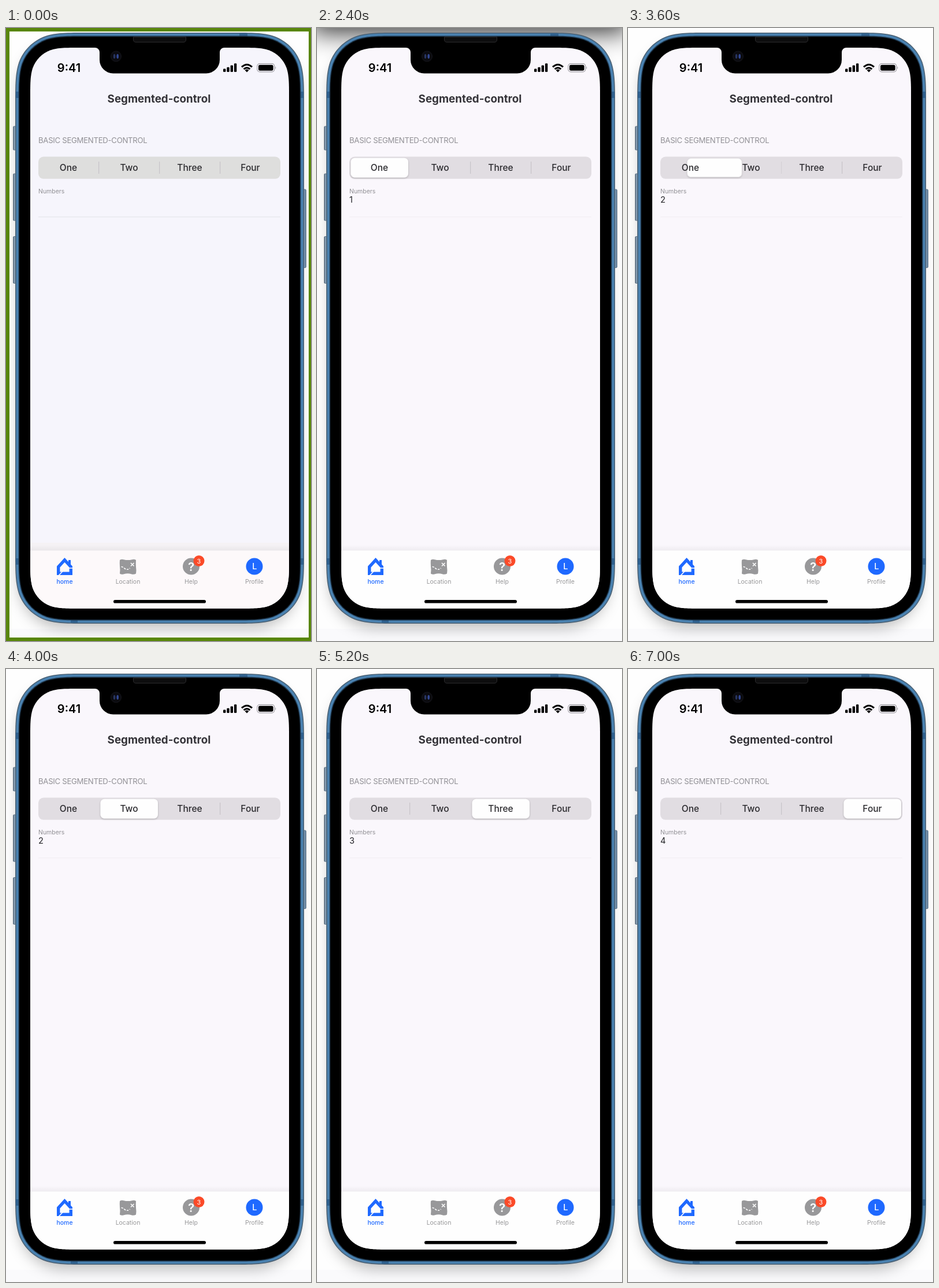
An HTML page for the animation above (8.8 s loop, 528 px wide and 1060 px high).

```html
<!DOCTYPE html>
<html lang="en">
<head>
<meta charset="utf-8">
<title>Segmented control</title>
<style>
  html, body { margin: 0; width: 100%; height: 100%; overflow: hidden; background: #fefefe; }
  svg { display: block; }
  #stage { width: 100vw; height: 100vh; font-family: Inter, Roboto, sans-serif; }
  .mid { text-anchor: middle; }
  .muted { fill: #919095; }
  .title { font-size: 18.8px; font-weight: 700; fill: #343338; }
  .label { font-size: 15.5px; font-weight: 500; fill: #2b2a2e; }
  .tab { font-size: 10.5px; text-anchor: middle; }
  .gray { fill: #98989a; }
  .blue { fill: #1f69ff; }

  /* Every track shares one 8.8 s clock and holds its pose between steps. */
  #stage, .anim { animation: 8.8s step-end infinite; }
  #stage { animation-name: tint; }
  .frame { animation-name: frame; }
  .above { animation-name: above; }
  .thumb { animation-name: slide; transform-box: fill-box; transform-origin: center; }
  .digits { animation-name: count; }
  .sep1 { animation-name: sep1; }
  .sep2 { animation-name: sep2; }
  .sep3 { animation-name: sep3; }

  @keyframes tint {
    0% { --page: #f6f5fc; --seg: #dededd; --rule: #e6e6eb; --bar: #fdf9fa; --band: .9; }
    2.27%, 100% { --page: #faf7fc; --seg: #e1dde2; --rule: #f2eff4; --bar: #fefefe; --band: 0; }
  }
  @keyframes frame { 0% { opacity: 1 } 2.27%, 100% { opacity: 0 } }
  @keyframes above { 0% { opacity: 0 } 2.27% { opacity: 1 } 36.36%, 100% { opacity: 0 } }
  @keyframes slide {
    0% { opacity: 0; transform: none }
    27.27% { opacity: 1; transform: none }
    40.9% { opacity: 1; transform: translateX(41.5px) scale(.95) }
    43.18% { opacity: 1; transform: translateX(105px) scale(.95) }
    45.45% { opacity: 1; transform: translateX(105px) }
    54.54% { opacity: 1; transform: translateX(161.5px) scale(.95) }
    56.81% { opacity: 1; transform: translateX(210px) scale(.95) }
    59.09% { opacity: 1; transform: translateX(210px) }
    74.99% { opacity: 1; transform: translateX(286.5px) scale(.95) }
    77.27% { opacity: 1; transform: translateX(315px) scale(.95) }
    79.54%, 100% { opacity: 1; transform: translateX(315px) }
  }
  @keyframes count {
    0% { transform: translateY(30px) }
    27.27% { transform: none }
    40.9% { transform: translateY(-30px) }
    54.54% { transform: translateY(-60px) }
    74.99%, 100% { transform: translateY(-90px) }
  }
  @keyframes sep1 { 0% { opacity: 1 } 27.27% { opacity: 0 } 56.81%, 100% { opacity: 1 } }
  @keyframes sep2 { 0% { opacity: 1 } 40.9% { opacity: .5 } 43.18% { opacity: 0 } 74.99%, 100% { opacity: 1 } }
  @keyframes sep3 { 0% { opacity: 1 } 54.54% { opacity: .5 } 56.81%, 100% { opacity: 0 } }
</style>
</head>
<body>
<svg id="stage" viewBox="0 0 528 1060" preserveAspectRatio="none">
  <defs>
    <filter id="soft" x="-30%" y="-30%" width="160%" height="160%"><feGaussianBlur stdDeviation="12"/></filter>
    <filter id="wide" x="-30%" y="-60%" width="160%" height="220%"><feGaussianBlur stdDeviation="22"/></filter>
    <filter id="lift" x="-20%" y="-30%" width="140%" height="170%">
      <feDropShadow dx="0" dy="1.2" stdDeviation="1.5" flood-opacity=".24"/>
    </filter>
    <linearGradient id="fade" x2="0" y2="1">
      <stop offset="0" stop-color="#000" stop-opacity="0"/>
      <stop offset="1" stop-color="#000" stop-opacity=".05"/>
    </linearGradient>
    <linearGradient id="key">
      <stop offset="0" stop-color="#4c5c6b"/>
      <stop offset=".35" stop-color="#91a8bd"/>
      <stop offset="1" stop-color="#5b7c9a"/>
    </linearGradient>
    <clipPath id="glass"><path data-box="42 34 448 969.7 56"/></clipPath>
  </defs>

  <!-- Backdrop -->
  <rect width="528" height="1060" fill="#fefefe"/>
  <rect y="1039" width="528" height="21" fill="#fafafc"/>
  <rect class="anim above" x="-10" y="-140" width="548" height="148" filter="url(#wide)" fill-opacity=".8"/>
  <rect x="22" y="28" width="484" height="1010" rx="78" filter="url(#soft)" fill-opacity=".26"/>
  <path class="anim frame" fill="#588609" fill-rule="evenodd" d="M0 0H528V1060H0ZM6 6V1054H524V6Z"/>

  <!-- Phone body -->
  <g fill="url(#key)" stroke="#52687b" stroke-width=".8">
    <rect x="12.4" y="170" width="7" height="41" rx="1.6"/>
    <rect x="12.4" y="252" width="7" height="81" rx="1.6"/>
    <rect x="12.4" y="360.5" width="7" height="81" rx="1.6"/>
    <rect x="512" y="279" width="7.4" height="135.5" rx="1.6"/>
  </g>
  <path data-box="16 8 500 1022 82" fill="#4a6073"/>
  <path data-box="17.6 9.6 496.8 1018.8 80.4" fill="#4a82b1"/>
  <g fill="#2f618f">
    <rect x="404" y="9.6" width="14" height="4.4"/>
    <rect x="112" y="1024" width="12" height="4.4"/>
    <rect x="17" y="110" width="6" height="11"/>
    <rect x="509" y="110" width="6" height="11"/>
    <rect x="17" y="917" width="6" height="11"/>
    <rect x="509" y="917" width="6" height="11"/>
  </g>
  <path data-box="21.6 13.6 488.8 1010.8 76.4" fill="#1c3246"/>
  <path data-box="23.2 15.2 485.6 1007.6 74.800"/>

  <!-- Screen -->
  <g clip-path="url(#glass)">
    <rect x="42" y="34" width="448" height="970" style="fill: var(--page)"/>
    <rect x="42" y="890" width="448" height="14" fill="#f5f2f4" style="opacity: var(--band)"/>
    <rect x="42" y="894" width="448" height="10" fill="url(#fade)"/>
    <rect x="42" y="903.5" width="448" height="101" style="fill: var(--bar)"/>
  </g>

  <!-- Notch, speaker, camera -->
  <path d="M154 33V34A8 8 0 0 1 162 42V55A23.5 23.5 0 0 0 185.5 78.5H346.5A23.5 23.5 0 0 0 370 55V42A8 8 0 0 1 378 34V33Z"/>
  <path d="M220.5 15.5H311.5V20Q311.5 24.5 307 24.5H225Q220.5 24.5 220.5 20Z" fill="#0d0d0e" stroke="#2b2b2d"/>
  <circle cx="190.5" cy="49" r="9" fill="#0b0b10" stroke="#17171c"/>
  <ellipse cx="187.6" cy="49" rx="1.8" ry="4" fill="#27345f"/>
  <ellipse cx="193.2" cy="49" rx="1.8" ry="4" fill="#324894"/>

  <!-- Status bar -->
  <text x="109" y="76" class="mid" font-size="20" font-weight="600">9:41</text>
  <rect x="376" y="70.5" width="4.4" height="5.5" rx="1.2"/>
  <rect x="382.3" y="67.8" width="4.4" height="8.2" rx="1.2"/>
  <rect x="388.6" y="64.6" width="4.4" height="11.4" rx="1.2"/>
  <rect x="394.9" y="61.3" width="4.4" height="14.7" rx="1.2"/>
  <g fill="none" stroke="#000" stroke-width="3">
    <path d="M408 67.4Q417 59 426 67.4"/>
    <path d="M411.6 71.2Q417 66.2 422.4 71.2"/>
  </g>
  <path d="M413.6 73Q417 70.2 420.4 73L417 76.4Z"/>
  <rect x="434.9" y="61.6" width="29.8" height="14.2" rx="4.4" fill="none" stroke="#a09fa4" stroke-width="1.2"/>
  <rect x="437" y="63.7" width="25.6" height="10" rx="2.6"/>
  <path d="M466.2 66.2Q468.4 68.7 466.2 71.2Z" fill="#a09fa4"/>

  <!-- Page -->
  <text x="265" y="128.7" class="mid title">Segmented-control</text>
  <text x="56" y="198.6" class="muted" font-size="13.2" letter-spacing="-.3">BASIC SEGMENTED-CONTROL</text>
  <rect x="56" y="222.5" width="419" height="38.3" rx="9" style="fill: var(--seg)"/>
  <g fill="#c7c4c9">
    <rect class="anim sep1" x="160" y="231" width="1.2" height="21"/>
    <rect class="anim sep2" x="265" y="231" width="1.2" height="21"/>
    <rect class="anim sep3" x="370" y="231" width="1.2" height="21"/>
  </g>
  <rect class="anim thumb" x="58.5" y="224.8" width="99.5" height="33.7" rx="7" fill="#fefefe" filter="url(#lift)"/>
  <g class="mid label">
    <text x="108" y="247.2">One</text>
    <text x="213" y="247.2">Two</text>
    <text x="318" y="247.2">Three</text>
    <text x="423" y="247.2">Four</text>
  </g>
  <text x="56" y="286" class="muted" font-size="10.5">Numbers</text>
  <svg x="56" y="288" width="20" height="19" overflow="hidden">
    <g class="anim digits" font-size="14.6" fill="#222226">
      <text y="14">1</text>
      <text y="44">2</text>
      <text y="74">3</text>
      <text y="104">4</text>
    </g>
  </svg>
  <rect x="56" y="326" width="419" height="1.2" style="fill: var(--rule)"/>

  <!-- Tab bar -->
  <g fill="none" stroke-width="5.4">
    <path d="M90.7 943.3V931.8L101.5 920L112.3 931.8V943.3Z" stroke="#1f69ff"/>
    <path d="M110 920V928" stroke="#1f69ff" stroke-width="4"/>
    <path d="M91 947L98 939.5M106 934L116 934" style="stroke: var(--bar)" stroke-width="1.6"/>
  </g>
  <text x="101.5" y="961" class="tab blue" font-weight="500">home</text>

  <path class="gray" d="M197 920Q200 918 204 919.2Q211 921 218 919.2Q222 918 225 920Q224.5 926 225 932Q226 938 225 943.5Q221 945.5 217 944.2Q211 942.500 204 944.2Q200 945.5 197 943.5Q198 937 197 931Q196.500 925 197 920Z"/>
  <g fill="none" stroke="#fff" stroke-width="1.6">
    <path d="M199.5 931.5Q203 932 206 935Q210 938 214.5 934" stroke-dasharray="3.4 1.9"/>
    <path d="M216 925L221.5 930.5M221.5 925L216 930.5"/>
  </g>
  <text x="211" y="961" class="tab gray">Location</text>

  <circle class="gray" cx="320.5" cy="931" r="14.5"/>
  <text x="320.5" y="938.5" class="mid" font-size="20.5" font-weight="600" fill="#fff">?</text>
  <circle cx="334" cy="921.5" r="9.5" fill="#fb4a28"/>
  <text x="334" y="925.5" class="mid" font-size="11" fill="#fff">3</text>
  <text x="320.5" y="961" class="tab gray">Help</text>

  <circle class="blue" cx="430" cy="931" r="14.5"/>
  <text x="430.3" y="936.2" class="mid" font-size="14.5" font-weight="500" fill="#fff">L</text>
  <text x="430" y="961" class="tab gray">Profile</text>

  <rect x="186" y="988.9" width="160" height="5.7" rx="2.85"/>
</svg>
<script>
  // Rounded box with continuous corners: curvature eases in before each arc.
  function smoothBox(x, y, w, h, r) {
    const corner = (px, py, ux, uy, vx, vy) => {
      const at = (a, b) => `${px + r * (a * ux + b * vx)} ${py + r * (a * uy + b * vy)}`;
      return `L${at(1.53, 0)}C${at(1.09, 0)} ${at(.87, 0)} ${at(.63, .075)}` +
        `C${at(.37, .17)} ${at(.17, .37)} ${at(.075, .63)}` +
        `C${at(0, .87)} ${at(0, 1.09)} ${at(0, 1.53)}`;
    };
    const path = corner(x, y, 0, 1, 1, 0) + corner(x + w, y, -1, 0, 0, 1) +
      corner(x + w, y + h, 0, -1, -1, 0) + corner(x, y + h, 1, 0, 0, -1);
    return 'M' + path.slice(1) + 'Z';
  }
  for (const el of document.querySelectorAll('[data-box]'))
    el.setAttribute('d', smoothBox(...el.dataset.box.split(' ').map(Number)));
</script>
</body>
</html>
```
